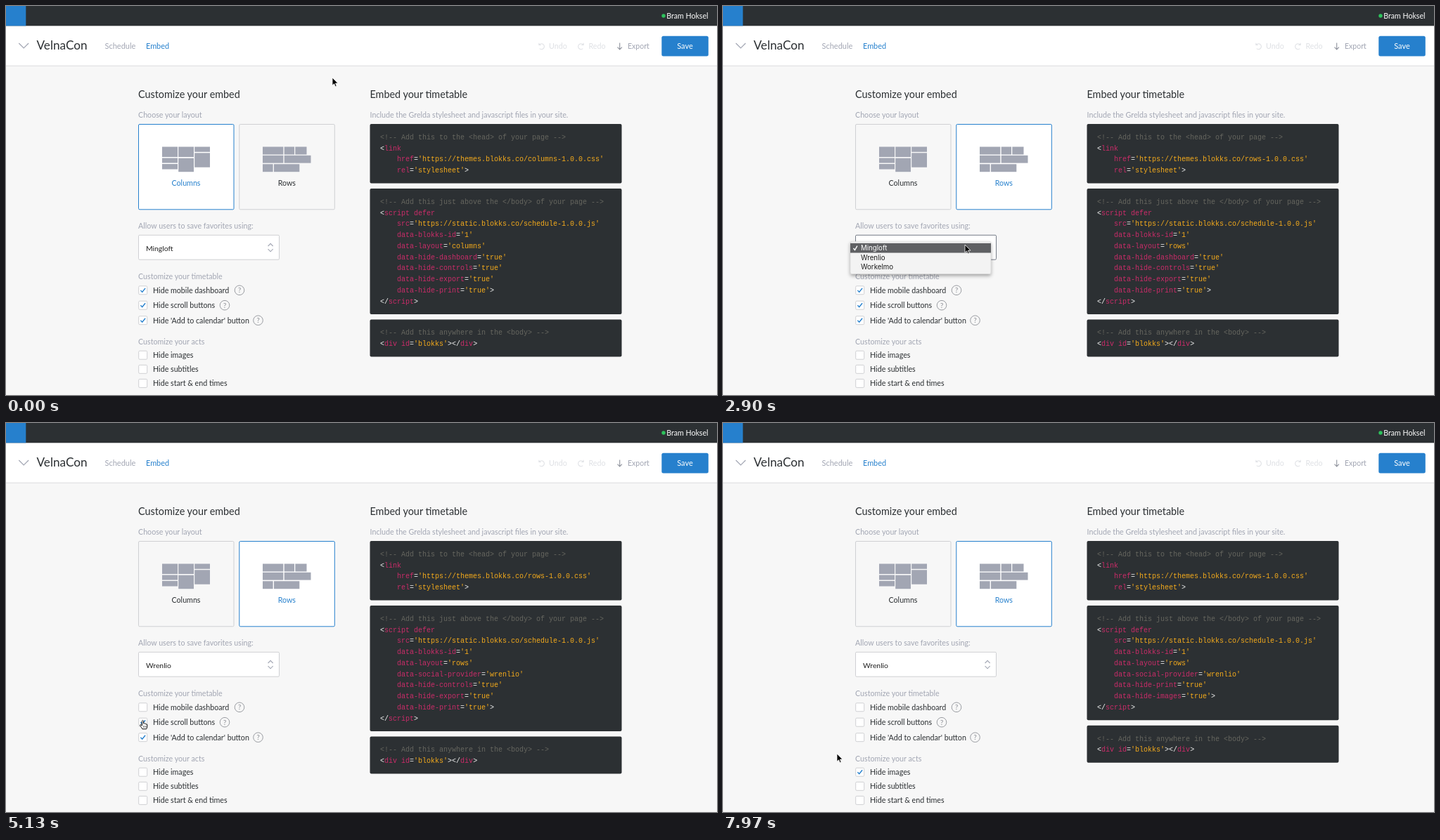
An HTML page that plays this animation: 1011x554 px, repeating every 8000 ms.

```html
<!DOCTYPE html>
<html lang="en">
<head>
<meta charset="utf-8">
<title>Embed settings</title>
<style>
  html, body { margin: 0; width: 100%; height: 100%; overflow: hidden; background: #f7f7f7; }
  svg { display: block; width: 100%; height: 100%; }
  text { font-family: Lato, sans-serif; font-size: 10.7px; white-space: pre; }
  .code text { font-family: "Liberation Mono", monospace; font-size: 10px; }
  .menu text { font-family: Inter, sans-serif; font-size: 9.7px; }
</style>
</head>
<body>
<svg viewBox="0 0 1011 554">
  <defs>
    <filter id="shadow" x="-10%" y="-30%" width="120%" height="180%">
      <feDropShadow dx="0" dy="2.5" stdDeviation="2.6" flood-opacity=".35"/>
    </filter>
  </defs>
  <g id="page"></g>
  <g id="live"></g>
</svg>
<script>
const LOOP = 8000;
const DARK = '#2c3033', BLUE = '#2680cd', GREY = '#a2a6b3', PALE = '#dfe1e5', PAGE = '#f7f7f7';
const PINK = '#cb2c69', ORANGE = '#f5ab1c', COMMENT = '#66665f', EDGE = '#cfd0d3', HOVER = [118, 124, 136];
const LINE = 15.77;
const PROVIDERS = ['Mingloft', 'Wrenlio', 'Workelmo'];

const escapeText = s => s.replace(/&/g, '&amp;').replace(/</g, '&lt;').replace(/>/g, '&gt;');
const text = (x, y, s, fill = DARK, extra = '') =>
  `<text x="${x}" y="${y}" fill="${fill}" ${extra}>${escapeText(s)}</text>`;
const sized = (x, y, s, size, fill, extra = '') => text(x, y, s, fill, `style="font-size:${size}px" ${extra}`);
const rect = (x, y, w, h, fill, extra = '') =>
  `<rect x="${x}" y="${y}" width="${w}" height="${h}" fill="${fill}" ${extra}/>`;
const stroke = (d, color, width = 1, extra = '') =>
  `<path d="${d}" fill="none" stroke="${color}" stroke-width="${width}" ${extra}/>`;
const at = (x, y, content, extra = '') => `<g transform="translate(${x} ${y})" ${extra}>${content}</g>`;

const clamp = v => Math.min(1, Math.max(0, v));
const span = (t, a, b) => clamp((t - a) / (b - a));
const smooth = p => p * p * (3 - 2 * p);
const easeIn = p => p ** 1.6;
const easeOut = p => 1 - (1 - p) ** 1.8;

// Pointer moves: start, end, target x, target y, easing
const MOVES = [
  [480, 810, 403, 224, smooth],
  [2270, 2880, 344, 340, smooth],
  [3140, 3380, 343, 357, smooth],
  [3780, 4100, 244, 391, easeIn],
  [4100, 4380, 194.5, 402, easeOut],
  [4890, 5130, 194.5, 423, smooth],
  [5790, 6180, 194.5, 444, smooth],
  [6790, 7280, 196, 492, smooth],
  [7800, 7970, 162, 471, smooth]
];

function pointerAt(t) {
  let x = 464, y = 102;
  for (const [start, end, tx, ty, ease] of MOVES) {
    const p = ease(span(t, start, end));
    x += (tx - x) * p;
    y += (ty - y) * p;
  }
  return { x, y };
}

// Checkbox rows: y, label, initially checked, toggle time, help icon x
const OPTIONS = [
  [404.8, 'Hide mobile dashboard', true, 4600, 332],
  [426.2, 'Hide scroll buttons', true, 5630, 311],
  [447.7, "Hide 'Add to calendar' button", true, 6570, 358.5],
  [497.2, 'Hide images', false, 7570],
  [517.3, 'Hide subtitles', false, Infinity],
  [537.4, 'Hide start & end times', false, Infinity]
];

function codeLine(x, y, line) {
  const body = line.trimStart();
  const left = x + (line.length - body.length) * 6;
  if (body.startsWith('<!--')) return text(left, y, body, COMMENT);
  const tokens = body.match(/'[^']*'|[\w-]+|[^\w'-]+/g);
  const color = s => s[0] === "'" ? ORANGE : /\w/.test(s) ? PINK : '#f4f4f4';
  const spans = tokens.map(s => `<tspan fill="${color(s)}">${escapeText(s)}</tspan>`);
  return `<text x="${left}" y="${y}">${spans.join('')}</text>`;
}

const blockHeight = lines => lines.length * LINE + 21.4;
const codeBlock = (y, lines) => rect(517.5, y, 358, blockHeight(lines), DARK, 'rx="2"') +
  lines.map((line, i) => codeLine(532, y + 21.8 + i * LINE, line)).join('');

function codePanel(t) {
  const layout = t < 1770 ? 'columns' : 'rows';
  const attributes = [
    "src='https://static.blokks.co/schedule-1.0.0.js'",
    "data-blokks-id='1'",
    `data-layout='${layout}'`,
    t >= 4140 && `data-social-provider='${PROVIDERS[1].toLowerCase()}'`,
    t < 4900 && "data-hide-dashboard='true'",
    t < 5900 && "data-hide-controls='true'",
    t < 6840 && "data-hide-export='true'",
    "data-hide-print='true'",
    t >= 7830 && "data-hide-images='true'"
  ].filter(Boolean).map(a => '    ' + a);
  attributes[attributes.length - 1] += '>';
  const blocks = [
    ['<!-- Add this to the <head> of your page -->', '<link',
      `    href='https://themes.blokks.co/${layout}-1.0.0.css'`, "    rel='stylesheet'>"],
    ['<!-- Add this just above the </body> of your page -->', '<script defer', ...attributes, '<' + '/script>'],
    ['<!-- Add this anywhere in the <body> -->', "<div id='blokks'></div>"]
  ];
  let y = 168;
  return '<g class="code">' + blocks.map(lines => {
    const block = codeBlock(y, lines);
    y += blockHeight(lines) + 7.5;
    return block;
  }).join('') + '</g>';
}

const bars = list => list.map(([x, y, w, h]) => rect(x, y, w, h, GREY)).join('');
const COLUMN_ICON = bars([[222, 200.5, 22, 14.5], [222, 216.5, 22, 7], [222, 225, 22, 7.5],
  [245.2, 200.5, 21.8, 14.5], [245.2, 216.7, 21.8, 19.5], [268.2, 200.5, 21.8, 7.3], [268.2, 209.3, 21.8, 20.4]]);
const ROW_ICON = bars([[365, 200.5, 29.3, 11], [395.7, 200.5, 14.3, 11], [411.3, 200.5, 16.2, 11],
  [365, 212.8, 29.3, 10.8], [395.7, 212.8, 37.8, 10.8], [365, 225.2, 14.6, 11], [381, 225.2, 36.3, 11]]);

function layoutCard(x, label, icon, selected, hovered) {
  const edge = hovered ? `rgb(${HOVER})` : selected ? BLUE : EDGE;
  return rect(x, 168.5, 135.5, 121.3, selected || hovered ? '#fff' : PAGE, `stroke="${edge}" rx="1.5"`) + icon +
    text(x + 67.5, 256, label, selected ? BLUE : DARK, 'text-anchor="middle"');
}

function selectBox(t, y) {
  const focus = t > 2270 && y > 326 ? 1 - span(t, 4600, 4700) : 0;
  const mix = (from, to) => `rgb(${from.map((v, i) => Math.round(v + (to[i] - v) * focus))})`;
  return rect(188.5, 326.3, 200, 34.9, '#fff', `stroke="${mix([207, 208, 211], HOVER)}" rx="1.5"`) +
    sized(199, 348.5, PROVIDERS[t < 3800 ? 0 : 1], 10.4, '#222') +
    stroke('M372.6 342l3.5-3.6 3.5 3.6M372.6 346.2l3.5 3.6 3.5-3.6', mix([162, 166, 179], [44, 48, 51]), 1.1);
}

function menu(t, y) {
  if (t < 2890 || t > 4115) return '';
  const active = y < 351.3 ? 0 : 1;
  const blink = t >= 3670 && t < 3735;
  const rows = PROVIDERS.map((name, i) => {
    const lit = i === active && !blink;
    const top = 337.8 + i * 13.6;
    const ink = lit ? '#fff' : '#1c1c1c';
    return (lit ? rect(181, top, 200, 13.7, '#5f6063') : '') + text(196, top + 10.3, name, ink) +
      (i ? '' : stroke('M185.5 345l2 2.6 3.4-6', ink, 1.4));
  }).join('');
  return `<g class="menu" opacity="${1 - span(t, 3830, 4115)}">` +
    rect(181, 335.2, 200, 46.5, '#f3f3f3', 'rx="2.5" stroke="#bbb" stroke-width=".4" filter="url(#shadow)"') + rows + '</g>';
}

function checkboxes(t) {
  return OPTIONS.map(([y, , initial, toggle]) => {
    const checked = initial !== (t >= toggle);
    return at(194.7, y, rect(-6, -6, 12, 12, '#fff', `stroke="${EDGE}" rx="1.5"`) +
      (checked ? stroke('M-3.3 .1L-1 2.6 3.4-2.9', BLUE, 1.4) : ''));
  }).join('');
}

const ARROW = '<path d="M0 0V11.2L2.6 8.8 4.3 12.7 6.1 11.9 4.5 8.1H8Z" fill="#000" stroke="#fff" stroke-width=".8"/>';
const HAND = '<path d="M-1.1 1.3Q0-.6 1.1 1.3V5Q2.2 4 2.9 5.3 4.1 4.5 4.6 5.9 6.1 5.5 6.3 7.1V9Q6.2 11 5.1 12.8H-.6Q-1.7 10.8-3.6 8.3-4.4 6.4-2.8 6.6L-1.1 8Z" fill="#fff" stroke="#000" stroke-width=".95"/>' +
  stroke('M1 8.3v2.4M2.8 8.3v2.4M4.5 8.3v2.4', '#000', .6);

function staticPage() {
  const help = x => y => at(x, y, '<circle r="6.8" fill="none" stroke="#8f9298" stroke-width=".9"/>' +
    sized(0, 3.3, '?', 9.5, '#85888f', 'text-anchor="middle"'));
  const labels = [[159.3, 'Choose your layout'], [317, 'Allow users to save favorites using:'],
    [388.5, 'Customize your timetable'], [481.8, 'Customize your acts']];
  const turn = 'M-3.2-2.6A4 4 0 1 1-2.8 3M-3.6-5V-2.2H-.8';
  return rect(0, 0, 1011, 554, PAGE) + rect(0, 28, 1011, 57, '#fff') + rect(0, 84.7, 1011, 1, '#dcdddf') +
    rect(0, 0, 1011, 28.3, DARK) + rect(0, 0, 28.3, 28.3, BLUE) +
    '<circle cx="935" cy="14" r="2.7" fill="#2dc25c"/>' +
    sized(998.5, 17.6, 'Bram Hoksel', 10.6, '#fff', 'text-anchor="end"') +
    stroke('M18.3 53l6.9 7 6.9-7', GREY, 1.2) + sized(43.5, 61.6, 'VelnaCon', 17.2, DARK) +
    sized(140.5, 61, 'Schedule', 11, GREY) + sized(199, 61, 'Embed', 10.9, BLUE) +
    at(761.5, 57.7, stroke(turn, PALE, 1.1)) + text(772, 61, 'Undo', PALE) +
    at(817.5, 57.7, stroke(turn, PALE, 1.1, 'transform="scale(-1 1)"')) + text(828.5, 61, 'Redo', PALE) +
    stroke('M872.7 52.5v9.3M869.5 58.6l3.2 3.3 3.2-3.3', '#8f939d', 1.1) + sized(884, 61, 'Export', 10.5, GREY) +
    rect(932.3, 42.8, 66.5, 28.7, BLUE, 'rx="2.5"') + sized(965.5, 61, 'Save', 11, '#fff', 'text-anchor="middle"') +
    sized(188, 131, 'Customize your embed', 14.4, DARK) + sized(517.5, 131, 'Embed your timetable', 14.4, DARK) +
    labels.map(([y, s]) => text(188, y, s, GREY)).join('') +
    text(517.5, 159.3, 'Include the Grelda stylesheet and javascript files in your site.', GREY) +
    OPTIONS.map(([y, label, , , helpX]) => text(209, y + 4, label) + (helpX ? help(helpX)(y) : '')).join('');
}

function scene(t) {
  const { x, y } = pointerAt(t);
  const overRows = x > 331 && x < 468 && y > 168 && y < 290;
  const overOption = x > 188 && OPTIONS.some(([row]) => Math.abs(y - row) < 7);
  const rows = t >= 1500;
  return layoutCard(188.5, 'Columns', COLUMN_ICON, !rows, false) +
    layoutCard(331.8, 'Rows', ROW_ICON, rows, overRows) +
    codePanel(t) + selectBox(t, y) + checkboxes(t) + menu(t, y) +
    at(x.toFixed(2), y.toFixed(2), overRows || overOption ? HAND : ARROW);
}

const live = document.getElementById('live');
let shown = '';
function render(t) {
  const next = scene(t);
  if (next !== shown) live.innerHTML = shown = next;
}

document.getElementById('page').innerHTML = staticPage();
const begin = performance.now();
function tick() {
  render((performance.now() - begin) % LOOP);
  requestAnimationFrame(tick);
}
tick();
</script>
</body>
</html>
```
